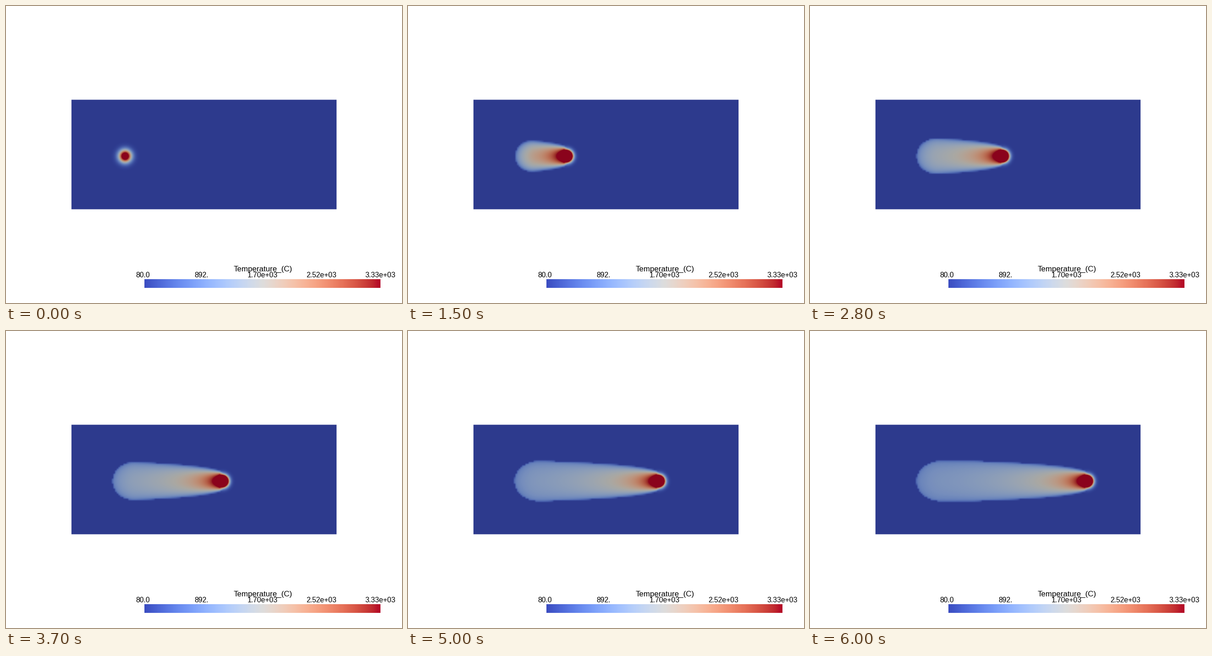
A matplotlib script that plays this animation: 864 px wide and 648 px high, repeating every 6100 ms.

```python
import numpy as np
import matplotlib.pyplot as plt
from matplotlib.animation import FuncAnimation
from matplotlib.patches import Rectangle

W, H, DPI = 864, 648, 100
FRAMES, STEP = 61, 100

LEFT, RIGHT, TOP, BOTTOM = 143, 721, 205, 443   # plate
START, TRACK_Y, SPEED = 260.0, 327.5, 5.74      # laser path, px per frame
LEAD = 8                                        # trail reach ahead of the laser
SHADE = np.array([0.768, 0.762, 0.738])         # lighting on the plate
CELL = 3.6                                      # mesh size in px

cmap = plt.get_cmap("coolwarm")


def hat_weights(lo, hi):
    """Mesh nodes on [lo, hi] and the weights that interpolate them to pixels."""
    nodes = np.linspace(lo, hi, round((hi - lo) / CELL) + 1)
    pixels = np.arange(lo, hi) + 0.5
    gap = np.abs(pixels[:, None] - nodes[None, :])
    return nodes, np.maximum(0, 1 - gap / (nodes[1] - nodes[0]))


xs, to_x = hat_weights(LEFT, RIGHT)
ys, to_y = hat_weights(TOP, BOTTOM)
X, Y = np.meshgrid(xs, ys)


def trail_width(d):
    reach = np.maximum(d + LEAD, 0.01)
    return np.minimum(14.2 * reach ** 0.204, 44)


def temperature(i):
    """Scaled temperature on the mesh: laser spot plus cooling trail."""
    laser = START + SPEED * i
    dy = Y - TRACK_Y
    d = laser - X

    warmup = np.exp(-i / 2)
    peak = 3.9 - 2.5 * warmup
    spread = 115 + 58 * warmup
    spot = peak * np.exp(-(d ** 2 + dy ** 2) / spread)

    # rounded rear end of the trail
    rear = 232 + 9 * np.exp(-i / 8)
    cap = 1.2 * trail_width(SPEED * i)
    cap_x = min(rear + cap, laser)
    u2 = (np.maximum(0, cap_x - X) / cap) ** 2

    u2 = u2 + (dy / trail_width(d)) ** 2
    axis = 3.9 * np.maximum(d, 6) ** -0.44 * (1 - warmup)
    sharp = 1.6 / (1 + np.maximum(d, 0) / 40)
    trail = axis * np.clip(1 - u2, 0, 1) ** sharp
    trail[d <= -LEAD] = 0

    return (spot ** 6 + trail ** 6) ** (1 / 6)


def plate_colours(i):
    heat = to_y @ temperature(i) @ to_x.T
    return cmap(np.clip(heat, 0, 1))[..., :3] * SHADE


fig = plt.figure(figsize=(W / DPI, H / DPI), dpi=DPI, facecolor="white")
ax = fig.add_axes([0, 0, 1, 1])
ax.axis("off")

# soft rim around the plate
ax.add_patch(Rectangle((LEFT - 0.2, TOP - 0.5), RIGHT - LEFT + 0.4,
                       BOTTOM - TOP + 1, lw=0, snap=False, zorder=-1,
                       color=np.array(cmap(0.0)[:3]) * SHADE))
plate = ax.imshow(plate_colours(0), extent=(LEFT, RIGHT, BOTTOM, TOP),
                  interpolation="nearest", aspect="auto")
ax.imshow(np.linspace(0, 1, 256)[None, :], cmap=cmap,
          extent=(302, 817, 615, 596), interpolation="nearest",
          aspect="auto")
ax.set_xlim(0, W)
ax.set_ylim(H, 0)


def label(x, y, text, px):
    ax.text(x, y, text, fontsize=px * 72 / DPI, family="Liberation Sans",
            color="black", ha="center", va="baseline")


label(561, 579, "Temperature_(C)", 16.9)
ticks = ["80.0", "892.", "1.70e+03", "2.52e+03", "3.33e+03"]
for x, text in zip([298.5, 426.5, 559.5, 688, 816.5], ticks):
    label(x, 592, text, 15.7)


def update(i):
    plate.set_data(plate_colours(i))
    return [plate]


anim = FuncAnimation(fig, update, frames=FRAMES, interval=STEP,
                     repeat=True, repeat_delay=0)
plt.show()
```
